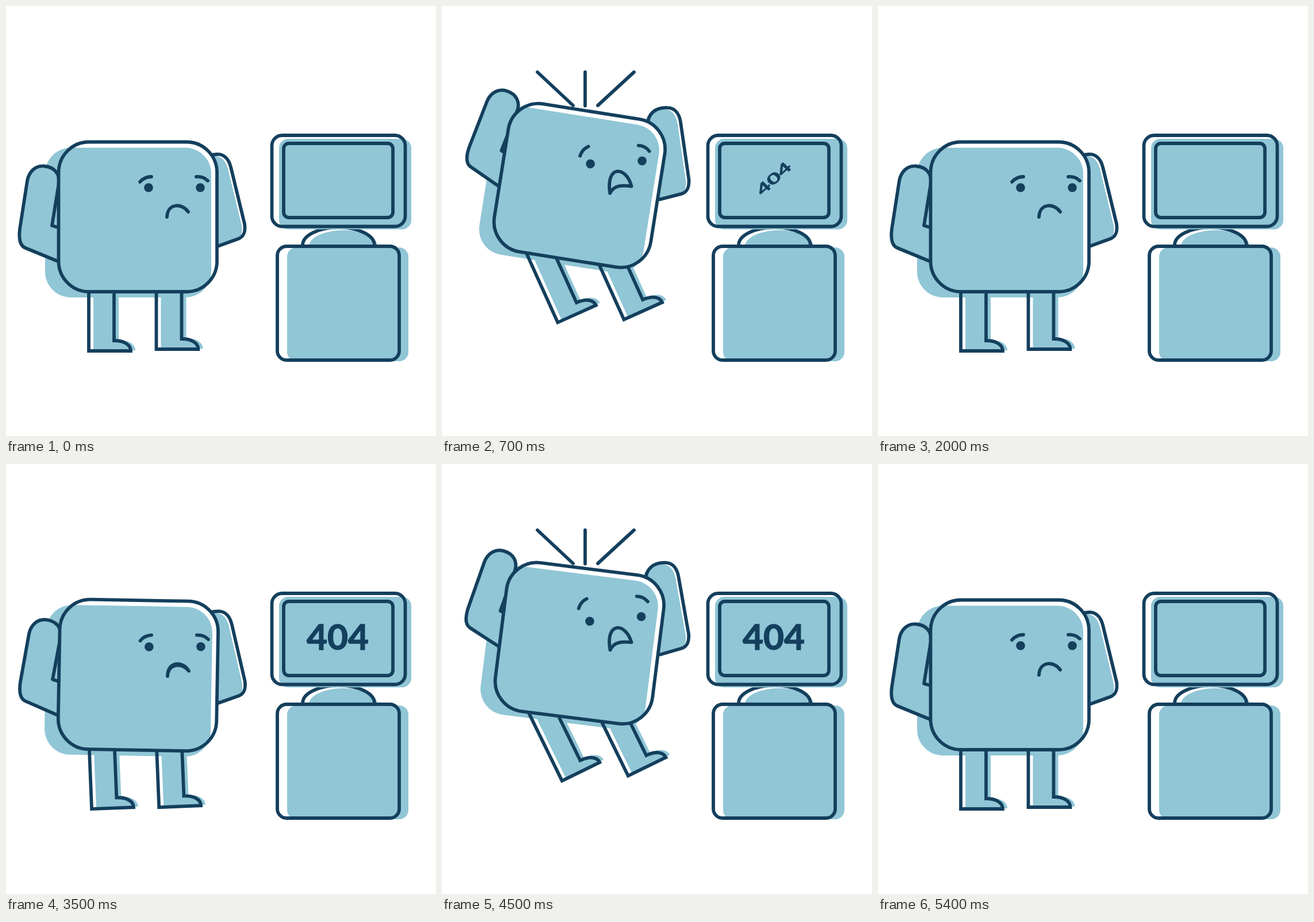
An HTML page for the animation above (6.83 s loop, 748 by 748 pixels).

```html
<!DOCTYPE html>
<html lang="en">
<head>
<meta charset="utf-8">
<title>Screen fright</title>
<style>
  html, body { margin: 0; width: 100%; height: 100%; overflow: hidden; background: #fff; }
  svg { display: block; width: 100vw; height: 100vh; }
  .tint { fill: #90c6d6; }
  .line { fill: none; stroke: #143f5d; stroke-width: 5.8; stroke-linecap: round; stroke-linejoin: round; }
  .leg { stroke-linejoin: miter; }
  .dot { fill: #143f5d; }
  #code { font: 700 62px Lato, "Open Sans", sans-serif; fill: #143f5d; stroke: #143f5d; stroke-width: 1.4; text-anchor: middle; }
</style>
</head>
<body>
<svg viewBox="0 0 748 748">
  <defs>
    <rect id="box" x="91.5" y="236.5" width="275.5" height="260.5" rx="53"/>
    <rect id="boxTint" x="68" y="246.5" width="289" height="260.5" rx="45"/>
    <clipPath id="inside"><use href="#box"/></clipPath>
    <path id="armL" d="M95 446L34 421C24 417 22 404 24 388L37 304C40 287 52 277.5 66 278.5C84 280 94 292 92 308L80 382L90 385"/>
    <path id="armR" d="M368 418L404 405C414 401 417 393 415 379L391 280C387 265 378 257 366 258C345 259 333 272 335 290L350 345"/>
    <path id="leg" d="M0 -150V0H73C73 -11 61 -18 44 -18V-150"/>
  </defs>

  <!-- computer -->
  <path class="tint" d="M527 418A59.500 28 0 0 1 646 418Z"/>
  <path class="line" d="M516 416A62.500 31 0 0 1 641 416"/>
  <rect class="tint" x="475" y="231" width="230" height="157.500" rx="16"/>
  <rect class="line" x="462.500" y="225" width="232" height="158.500" rx="18"/>
  <rect class="line" x="483" y="239" width="190" height="129" rx="9"/>
  <rect class="tint" x="489" y="420" width="211" height="198" rx="16"/>
  <rect class="line" x="472" y="418" width="212" height="198" rx="16"/>
  <g id="code">
    <text y="22.5">404</text>
    <text class="extra" x="6" y="-56.5">404</text>
    <text class="extra" x="-6" y="101.5">404</text>
  </g>

  <!-- character -->
  <path id="shock" class="line" d="M166 115L228 173M249 115V173.500M334 115L271 173"/>
  <g id="hero">
    <use href="#boxTint" class="tint"/>
    <g id="legL"><use href="#leg" class="tint" x="8" y="-1"/><use href="#leg" class="line leg"/></g>
    <g id="legR"><use href="#leg" class="tint" x="8" y="-1"/><use href="#leg" class="line leg"/></g>
    <g id="handL"><use href="#armL" class="tint" x="-2" y="2"/><use href="#armL" class="line"/></g>
    <g id="handR"><use href="#armR" class="tint" x="-5" y="3"/><use href="#armR" class="line"/></g>
    <use href="#box" fill="#fff"/>
    <g clip-path="url(#inside)"><use href="#boxTint" class="tint"/></g>
    <use href="#box" class="line"/>
    <g id="face">
      <circle class="dot" cx="-45" r="7.800"/>
      <circle class="dot" cx="45" r="7.800"/>
      <path id="browL" class="line" d="M-60 -10Q-52 -19 -40 -19"/>
      <path id="browR" class="line" d="M38 -19Q50 -20 58 -12"/>
      <path id="mouth" class="line"/>
    </g>
  </g>
</svg>
<script>
const LOOP = 6830, HALF = 3400, LAST = 31;

// step, dx, dy, tilt, pose (0 sad, 1 frightened), brow lift
const KEYS = [
  [0, 0, 0, 0, 0, 0],
  [3, 2, 2, 3, .3, 3],
  [6, 6, -5, 6, .75, 6],
  [9, 10, -32.5, 8.1, 1, 8],
  [13, 10, -54.5, 9, 1, 8],
  [17, 10, -58.5, 8.4, 1, 13],
  [21, 10, -55, 7.2, 1, 17],
  [25, 6, -34, 5, 1, 14],
  [28, 2.5, -13, 3, .9, 8],
  [30, .5, -2, .8, .3, 2],
  [LAST, 0, 0, 0, 0, 0]
];

const FROWN = [-13, 51, -12, 27, 13, 26, 24, 42, 13, 26, -12, 27, -13, 51];
const SCREAM = [-14, 53, -19, 3.5, 17, 6.5, 24, 43, 7, 40, -6, 39, -14, 53];

// text shapes on the screen, one letter for every two steps
const GLITCH = {
  p: [1, 0, 0, 1],
  w: [1.98, -.12, .1, .42],
  t: [1.57, -.39, .12, .28],
  d: [.49, -.46, .3, .28]
};
const ORDER = "pwdptwdptwpdwdtp";

const el = id => document.getElementById(id);
const move = (id, value) => el(id).setAttribute("transform", value);
const show = (node, on) => node.setAttribute("visibility", on ? "visible" : "hidden");
const mix = (a, b, k) => a + (b - a) * k;
const extras = document.querySelectorAll(".extra");

// steps alternate between 30 and 70 ms
function stepAt(u) {
  const n = 2 * Math.floor(u / 100) + (u % 100 >= 30 ? 1 : 0) - 1;
  return Math.max(0, Math.min(LAST, n));
}

function poseAt(step) {
  const i = Math.max(1, KEYS.findIndex(k => k[0] >= step));
  const a = KEYS[i - 1], b = KEYS[i];
  const k = (step - a[0]) / (b[0] - a[0]);
  return a.map((v, j) => mix(v, b[j], k));
}

function drawLeg(id, from, to, q) {
  move(id, `translate(${mix(from[0], to[0], q)} ${mix(from[1], to[1], q)}) rotate(${-33.3 * q})`);
}

function drawHero(step) {
  const [, dx, dy, tilt, q, brow] = poseAt(step);
  move("hero", `translate(${dx} ${dy}) rotate(${tilt} 229 367)`);
  drawLeg("legL", [144, 600], [229, 608], q);
  drawLeg("legR", [261.5, 597], [342, 585], q);
  move("handL", `translate(${3.5 * q} ${-57 * q}) rotate(${3.4 * q} 29 417)`);
  move("handR", `translate(${2 * q} ${-52 * q}) rotate(${-3.6 * q} 412 403)`);
  move("face", `translate(${293 - 7 * q} ${316 + q}) rotate(${-12.3 * q})`);
  move("browL", `translate(${-5 * q} ${-brow}) rotate(${-21 * q} -50 -16)`);
  move("browR", `translate(${2 * q} ${-brow + 2 * q}) rotate(${12 * q} 48 -18)`);
  const m = FROWN.map((v, i) => mix(v, SCREAM[i], q));
  el("mouth").setAttribute("d", `M${m.slice(0, 2)}C${m.slice(2)}`);
  show(el("shock"), step >= 7 && step <= 25);
  move("shock", `translate(0 ${Math.max(0, 13 - step)})`);
}

function drawCode(step, u) {
  const kind = step === LAST ? "p" : ORDER[step >> 1];
  const on = step > 0 && u < 2000;
  show(el("code"), on);
  extras.forEach(row => show(row, on && kind === "t"));
  move("code", `matrix(${GLITCH[kind]} 577 300)`);
}

function frame() {
  const t = performance.now() % LOOP;
  const u = t < HALF ? t : t - HALF;
  const step = stepAt(u);
  drawHero(step);
  drawCode(step, u);
  requestAnimationFrame(frame);
}
frame();
</script>
</body>
</html>
```
